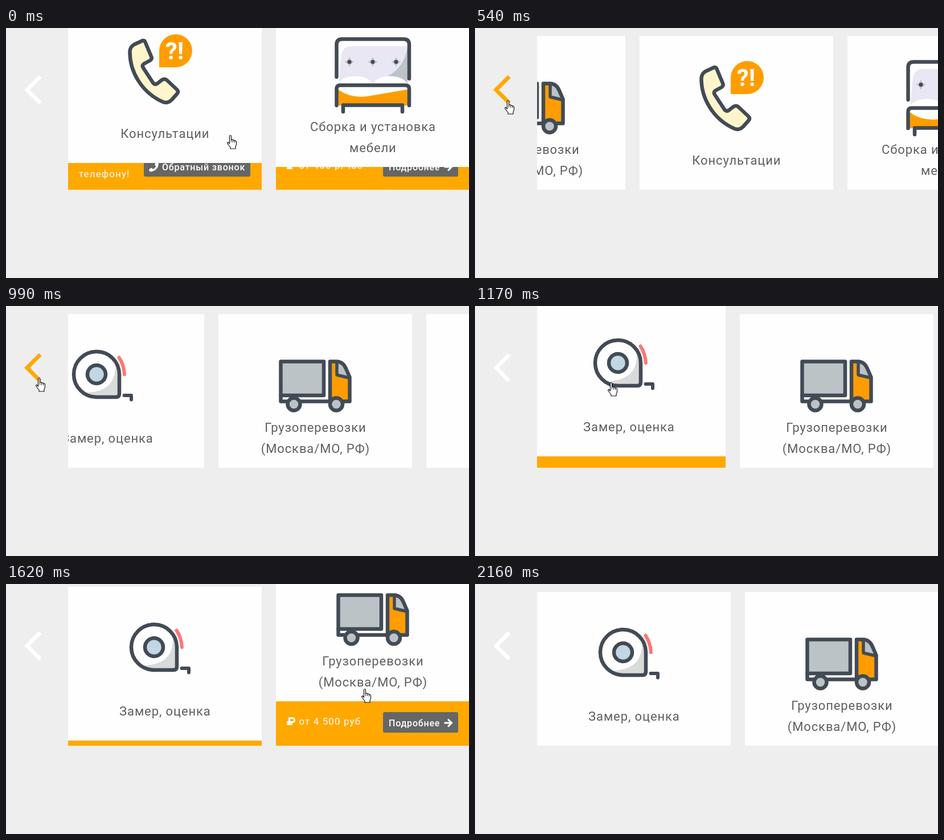
Write an HTML page that moves like this. It is 813x439 px and loops after 2250 ms.

```html
<!DOCTYPE html>
<html lang="ru">
<head>
<meta charset="utf-8">
<title>Карусель услуг</title>
<style>
  html, body { margin: 0; width: 100%; height: 100%; overflow: hidden; background: #eee; }
  svg { display: block; }
  text { font-family: Roboto, "Open Sans", sans-serif; }
  .title { font-size: 22px; letter-spacing: .9px; fill: #5c5f62; text-anchor: middle; }
  .note { font-size: 17px; letter-spacing: 1.1px; fill: #fff; }
  .label { font-size: 16px; font-weight: 500; letter-spacing: .8px; fill: #fff; }
  .mark { font-size: 42px; font-weight: 700; fill: #fff; text-anchor: middle; }
  .ink { stroke: #424b55; stroke-width: 6.5; stroke-linecap: round; stroke-linejoin: round; }
</style>
</head>
<body>
<svg id="stage" width="813" height="439" viewBox="0 0 813 439">
  <defs>
    <clipPath id="view"><rect x="109" width="704" height="439"/></clipPath>

    <g id="tape" transform="translate(-109)">
      <path d="M300 120V154Q300 160 294 160H260A40 40 0 1 1 300 120Z" fill="#fefefe"/>
      <path d="M292 96C297 130 282 153 236 152L250 160H294Q300 160 300 154V118Z" fill="#d9dada"/>
      <path class="ink" d="M300 120V154Q300 160 294 160H260A40 40 0 1 1 300 120Z" fill="none"/>
      <circle class="ink" cx="260" cy="120" r="16" fill="#c1d7e3"/>
      <path d="M299.500 90.500Q308 103 309 120" fill="none" stroke="#ff7676" stroke-width="6" stroke-linecap="round"/>
      <path class="ink" d="M308.500 157H321V164.500" fill="none" style="stroke-width:6"/>
    </g>

    <g id="truck" transform="translate(-474)">
      <path class="ink" d="M583.500 157V167.500H670" fill="none"/>
      <rect class="ink" x="583.500" y="97.500" width="75.500" height="59.500" fill="#bbc3c6"/>
      <path d="M670 97.500H682Q693 98 698 110L704.500 125V167.500H670Z" fill="#ff9d00"/>
      <path d="M682 97.500Q693 98 698 110L704.500 126L682 121Z" fill="#bbc3c6"/>
      <path class="ink" d="M682 98V121L703 126" fill="none" style="stroke-width:5.500"/>
      <path class="ink" d="M670 97.500H682Q693 98 698 110L704.500 125V167.500H670Z" fill="none"/>
      <circle class="ink" cx="606.500" cy="172.500" r="11" fill="#bbc3c6"/>
      <circle class="ink" cx="681" cy="172.500" r="11" fill="#bbc3c6"/>
    </g>

    <g id="phone">
      <path class="ink" fill="#fff5cc" d="M129 70Q134 67 136 73L146 97Q148 101 144 104L133 110Q129 113 132 117L149 143Q152 147 156 145L165 138Q170 135 174 139L191 155Q195 159 191 163L182 173Q175 180 167 177C128 160 108 122 108.500 88Q109 80 116 76Z"/>
      <path d="M160 116V87A29 29 0 1 1 189 116Z" fill="#ff9d00"/>
      <text class="mark" x="187" y="102">?!</text>
    </g>

    <g id="bed" transform="translate(-474)">
      <path d="M584 137L589 88Q591 72 607 72H705V137Z" fill="#e9e7f4"/>
      <path d="M705 73C702 98 688 118 664 127L705 137Z" fill="#bdc3c6"/>
      <path d="M583 138C592 121 632 119 644 138C656 119 696 121 705 138Z" fill="#fefefe"/>
      <path d="M583 148Q606 164 634 160L705 148V176H583Z" fill="#ff9d00"/>
      <path class="ink" d="M580.500 126V69Q580.500 59.500 590 59.500H698Q708 59.500 708 69V129" fill="none"/>
      <path class="ink" d="M580.500 176V147Q580.500 140.500 587 140.500H701Q708 140.500 708 147V176M592 187V175.500H696V187" fill="none"/>
      <g id="studs"></g>
    </g>

    <path id="arrow" d="M295.500 244H307.500M302 237.500L308.500 244L302 250.500" fill="none" stroke="#fff" stroke-width="3"/>
    <path id="handset" transform="translate(142 236)" d="M12 0L16.500 1Q17 1 17 2Q16 15 2 16.500Q1 16.500 1 15.500L0 12L5 9.500L7 12Q11 10 12.500 6.500L10 4.500Z" fill="#fff"/>
    <path id="ruble" d="M23.500 248V235.500H29Q32.500 235.500 32.500 239T29 242.500H19M19 246H29" fill="none" stroke="#fff" stroke-width="3"/>

    <g id="hand" stroke="#111" stroke-linejoin="round" stroke-linecap="round">
      <path d="M-1.500 1Q-1.500-.5 0-.5T1.500 1V7Q3.500 6 4.500 8Q6.500 7 7.500 9Q10.500 8.500 10.500 11.500V15Q10.500 17 9 19.500V23H0V20.500L-5 14Q-6 11.500-4 11.500L-1.500 14Z" fill="#fff" stroke-width="1.200"/>
      <path d="M1.500 7V11M4.500 8V11.500M7.500 9V12" fill="none"/>
    </g>
    <path id="pointer" d="M.5.500V16.500L4 13L6.500 18.500L9 17.500L6.500 12H11.500Z" fill="#fff" stroke="#111"/>
  </defs>

  <path id="prev" d="M60.200 85.200L36.900 108.500L60.200 131.800" fill="none" stroke-width="7"/>
  <g id="cards" clip-path="url(#view)"></g>
  <use id="cursor"/>
</svg>

<script>
const LOOP = 2250, STEP = 90, PITCH = 365, LEFT = 109, LIFT = 87;
const $ = id => document.getElementById(id);

// hover: [time, raised?]; from: state before the first entry
const cards = [
  { icon: 'tape', title: ['Замер, оценка'], note: ['Бесплатно при', 'заказе!'],
    label: 'Узнать больше', width: 163, from: 0, hover: [[1118, 1], [1433, 0]] },
  { icon: 'truck', title: ['Грузоперевозки', '(Москва/МО, РФ)'], price: 'от 4 500 руб',
    label: 'Подробнее', width: 132, from: 0, hover: [[1433, 1], [1889, 0]] },
  { icon: 'phone', title: ['Консультации'], note: ['Ответим по', 'телефону!'],
    label: 'Обратный звонок', width: 187, call: true, from: 0, hover: [[-94, 1], [163, 0]] },
  { icon: 'bed', title: ['Сборка и установка', 'мебели'], price: 'от 400 р/час',
    label: 'Подробнее', width: 132, from: 1, hover: [[-94, 0]] }
];

// cursor tip: [time, x, y]
const path = [
  [0, 394, 189], [90, 250, 162], [180, 104, 140], [270, 82, 134], [360, 58, 128],
  [990, 58, 127], [1080, 116, 130], [1170, 239, 135], [1260, 330, 146], [1350, 450, 158],
  [1440, 562, 164], [1620, 630, 185], [1800, 728, 262], [1890, 790, 370], [1980, 850, 400], [LOOP, 850, 400]
];

const text = (cls, x, y, s) => `<text class="${cls}" x="${x}" y="${y}">${s}</text>`;
const use = id => `<use href="#${id}"/>`;

function cardMarkup(c) {
  const titleY = c.title.length > 1 ? 221 : 240;
  const note = c.price
    ? use('ruble') + text('note', 40.5, 247, c.price)
    : c.note.map((s, i) => text('note', 19, 231 + 31 * i, s)).join('');
  return `<g>
    <rect y="15" width="340" height="269" fill="#ffa800"/>${note}
    <rect x="${320 - c.width}" y="225" width="${c.width}" height="36" rx="3" fill="#666"/>
    ${text('label', c.call ? 165 : 330 - c.width, 250, c.label)}${use(c.call ? 'handset' : 'arrow')}
    <g class="face"><rect y="14" width="340" height="270" fill="#fefefe"/>${use(c.icon)}
    ${c.title.map((s, i) => text('title', 170.4, titleY + 37 * i, s)).join('')}</g></g>`;
}

$('studs').innerHTML = [603, 644, 685].map(x => `<g transform="translate(${x} 99.500)">
  <path d="M0-9Q2-2 9 0Q2 2 0 9Q-2 2-9 0Q-2-2 0-9Z" fill="#bdc3c6"/><circle r="3.500" fill="#424b55"/></g>`).join('');
$('cards').innerHTML = cards.map(cardMarkup).join('');
cards.forEach((c, i) => {
  c.el = $('cards').children[i];
  c.face = c.el.querySelector('.face');
});

// cubic-bezier(.25, .1, .25, 1)
function ease(x) {
  if (x <= 0) return 0;
  if (x >= 1) return 1;
  const curve = (s, a, b) => 3 * (1 - s) ** 2 * s * a + 3 * (1 - s) * s * s * b + s ** 3;
  let lo = 0, hi = 1;
  for (let i = 0; i < 24; i++) {
    const mid = (lo + hi) / 2;
    if (curve(mid, .25, .25) < x) lo = mid; else hi = mid;
  }
  return curve(lo, .1, 1);
}

function raised(c, t) {
  return c.hover.reduce((v, [start, goal], i) => {
    const end = Math.min(t, i + 1 < c.hover.length ? c.hover[i + 1][0] : t);
    return v + (goal - v) * ease((end - start) / 300);
  }, c.from);
}

// the second click interrupts the first slide
function scroll(t) {
  const first = PITCH * ease((Math.min(t, 775) - 395) / 500);
  return first + (2 * PITCH - first) * ease((t - 775) / 490);
}

function cursorAt(t) {
  const i = path.findIndex(p => p[0] > t);
  const [t0, x0, y0] = path[i - 1], [t1, x1, y1] = path[i];
  const k = (t - t0) / (t1 - t0);
  return [x0 + (x1 - x0) * k, y0 + (y1 - y0) * k].map(Math.round);
}

function draw(t) {
  const shift = Math.round(scroll(t));
  cards.forEach((c, i) => {
    c.el.setAttribute('transform', `translate(${LEFT + shift + (i - 2) * PITCH})`);
    c.face.setAttribute('transform', `translate(0 ${-Math.round(LIFT * raised(c, t))})`);
  });
  const [x, y] = cursorAt(t);
  const onPrev = x < 64;
  const onCard = x > LEFT && y < 284;
  $('prev').setAttribute('stroke', onPrev ? '#ffa800' : '#fff');
  $('cursor').setAttribute('href', onPrev || onCard ? '#hand' : '#pointer');
  $('cursor').setAttribute('transform', `translate(${x} ${y})`);
}

const begin = performance.now();
function tick() {
  const t = (performance.now() - begin) % LOOP;
  draw(Math.floor(t / STEP) * STEP);
  requestAnimationFrame(tick);
}
tick();
</script>
</body>
</html>
```
